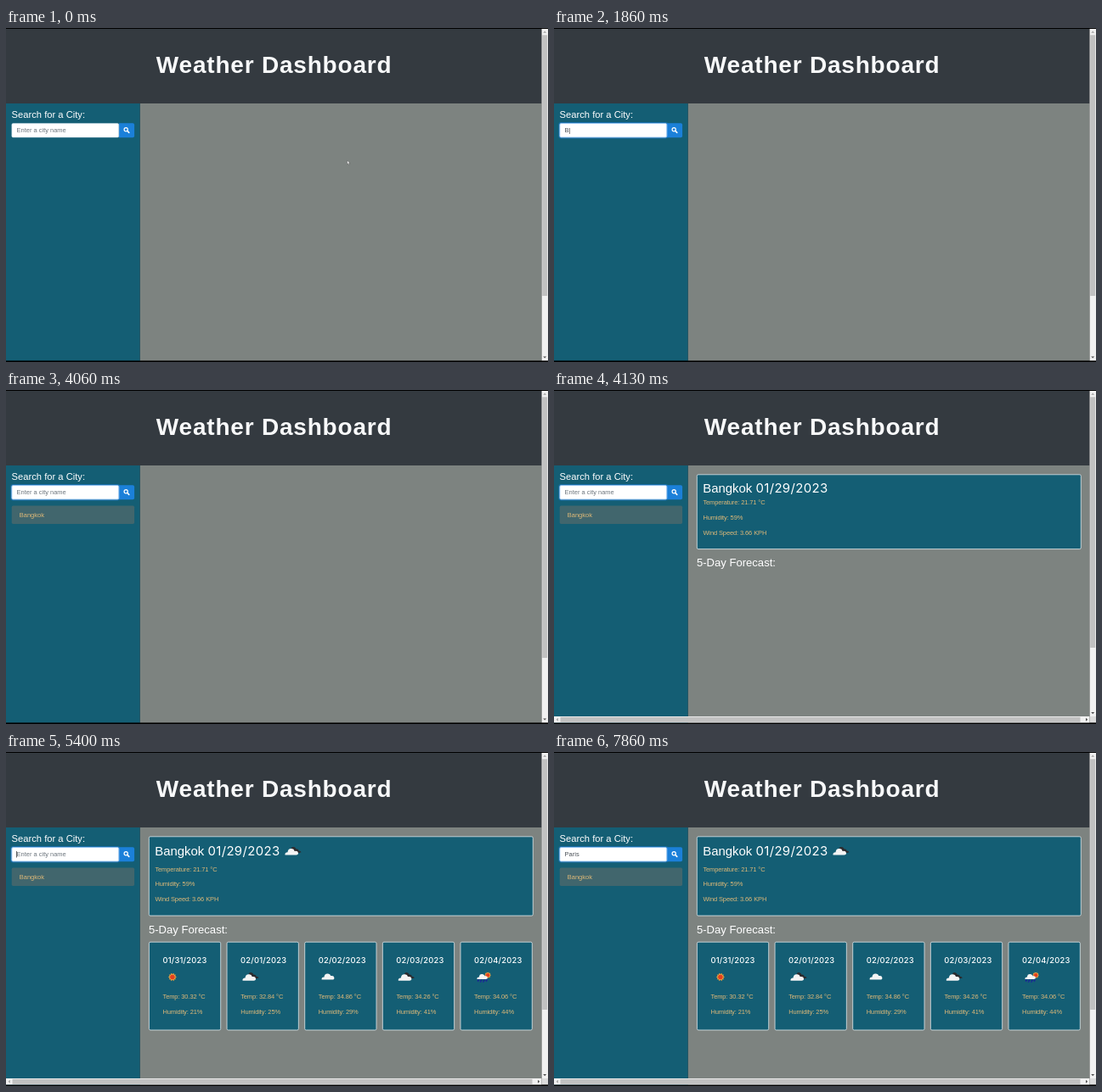
Animation of 638 by 394 pixels, one loop 8 s. Source, as an HTML page:

```html
<!DOCTYPE html>
<html lang="en">
<head>
<meta charset="utf-8">
<title>Weather Dashboard</title>
<style>
  html, body { margin: 0; height: 100%; overflow: hidden; background: #000; }
  svg { display: block; width: 100vw; height: 100vh; }
  text { font: 7.47px "Liberation Sans", Arial, sans-serif; white-space: pre; }
  .title { font-size: 28px; font-weight: 700; letter-spacing: .8px; }
  .h2 { font-size: 14.93px; }
  .h3 { font-size: 13.07px; }
  .h4 { font-size: 11.2px; }
  .h5 { font-size: 9.33px; }
  .date { font-family: Inter, sans-serif; font-weight: 500; letter-spacing: .025em; }
  .h2 .date { font-weight: 400; }
  .info { letter-spacing: -.1px; }
</style>
</head>
<body>
<svg id="stage" viewBox="0 0 638 394" preserveAspectRatio="none"></svg>
<script>
const LOOP = 8000, BLINK = 532;
const TEAL = '#145e74', GOLD = '#dfb978', WHITE = '#fff';
const stage = document.getElementById('stage');

// Key presses per word, and the moments that restart the caret blink.
const bangkok = [1860, 2130, 2400, 2600, 2930, 3060, 3260];
const paris = [5600, 5930, 6260, 6600, 6800];
const caretStarts = [800, ...bangkok, ...paris];

const days = [
  ['01/31/2023', '30.32', 21, 'sun'],
  ['02/01/2023', '32.84', 25, 'overcast'],
  ['02/02/2023', '34.86', 29, 'cloud'],
  ['02/03/2023', '34.26', 41, 'overcast'],
  ['02/04/2023', '34.06', 44, 'rain']
];

const rect = (x, y, w, h, fill, extra = '') =>
  `<rect x="${x}" y="${y}" width="${w}" height="${h}" fill="${fill}" ${extra}/>`;
const path = (d, fill, extra = '') => `<path d="${d}" fill="${fill}" ${extra}/>`;
const text = (x, y, s, fill = WHITE, cls = '') =>
  `<text x="${x}" y="${y}" fill="${fill}" class="${cls}">${s}</text>`;
const date = s => `<tspan class="date">${s}</tspan>`;
const info = (x, y, s) => text(x, y, s, GOLD, 'info');
const panel = (x, y, w, h) =>
  rect(x, y, w, h, TEAL, 'rx="1.6" stroke="#dfe9ec" stroke-width=".8"');

const puff = path('M-9 4.5q-.6-3 3-3.2q.4-4.6 4.8-4.2q2.8.3 3.4 2.8q3.8-.9 4.3 2.2q.3 2.4-2.5 2.4z',
  '#f4f4f4');

function sun(x, y, r) {
  let points = '';
  for (let i = 0; i < 20; i++) {
    const a = i * Math.PI / 10, d = i % 2 ? r * .68 : r;
    points += `${(x + d * Math.cos(a)).toFixed(2)},${(y + d * Math.sin(a)).toFixed(2)} `;
  }
  return `<polygon points="${points}" fill="#f2a33c"/><circle cx="${x}" cy="${y}" r="${r * .55}" fill="#e2401f"/>`;
}

const icons = {
  sun: sun(0, .2, 5),
  cloud: `<g transform="translate(1 -1) scale(.95)">${puff}</g>`,
  overcast: path('M-2-3q.6-2.6 3.4-2q2 .3 2.4 2.3q3 0 3.2 2.3q2.6.2 3 1.6l-6 1.6z', '#2c2b2e') + puff,
  rain: sun(4.6, -2, 4) +
    path('M-6 3l-1.2 2.6M-2.6 3l-1.6 3.6M.8 3l-1.6 3.6M3.8 3l-1.2 2.6', 'none', 'stroke="#1c2a96" stroke-width="1.6"') +
    `<g transform="translate(-.8 -.8) scale(.8)">${puff}</g>`
};
const icon = (name, x, y) => `<g transform="translate(${x} ${y})">${icons[name]}</g>`;

function arrow(x, y, angle, fill) {
  return path('M-2 1L0-1.2L2 1z', fill, `transform="translate(${x} ${y}) rotate(${angle})"`);
}

function scrollbars(both) {
  const bottom = both ? 385 : 392.4;
  let out = rect(630.5, 1, 7.5, bottom - 1, '#f1f1f1') +
    rect(631.2, 8.3, 6, (both ? 304 : 316) - 8.3, '#c1c1c1') +
    arrow(634.2, 4.7, 0, '#a3a3a3') + arrow(634.2, bottom - 4, 180, '#505050');
  if (both) {
    out += rect(0, 385, 630.5, 7.4, '#f1f1f1') + rect(630.5, 385, 7.5, 7.4, '#dcdcdc') +
      rect(7.5, 385.8, 612, 6, '#c1c1c1') +
      arrow(3.8, 388.7, -90, '#a3a3a3') + arrow(627, 388.7, 90, '#505050');
  }
  return out;
}

function searchBox(t) {
  const word = t < 4060 ? 'Bangkok' : 'Paris';
  const typed = word.slice(0, (t < 4060 ? bangkok : paris).filter(k => k <= t).length);
  const focus = Math.min(1, Math.max(0, (t - 800) / 200));
  const last = caretStarts.filter(k => k <= t).pop();
  const caretOn = last !== undefined && Math.floor((t - last) / BLINK) % 2 === 0;
  const caret = caretOn ? '<tspan fill="#222" dx="-.3">|</tspan>' : '';
  const content = typed
    ? text(12.6, 123.3, typed + caret, '#495057')
    : text(12.6, 123.3, 'Enter a city name', '#6c757d') + (caretOn ? rect(12.1, 117, .7, 7.5, '#222') : '');
  return text(6.6, 106, 'Search for a City:', WHITE, 'h4') +
    path('M133 112.3h16.2q1.9 0 1.9 1.9v13.1q0 1.9-1.9 1.9h-16.2z', '#1b80d9') +
    `<circle cx="141.2" cy="119.8" r="2.1" fill="none" stroke="#fff" stroke-width="1.2"/>` +
    path('M142.8 121.4l2 2', 'none', 'stroke="#fff" stroke-width="1.5" stroke-linecap="round"') +
    rect(6, 111.6, 127.6, 18.2, 'none', `rx="2.4" stroke="#1c7fe0" stroke-width="1.3" opacity="${focus * .45}"`) +
    rect(6.8, 112.5, 126, 16.5, WHITE, 'rx="1.6" stroke="#b9d3e0" stroke-width=".5"') +
    rect(6.8, 112.5, 126, 16.5, 'none', `rx="1.6" stroke="#80bdff" stroke-width=".6" opacity="${focus}"`) +
    content;
}

function pointer(t) {
  if (t >= 1860) return '';
  const p = Math.min(1, Math.floor((t + 7) / 66.67) / 9);
  const e = p * p * (3 - 2 * p);
  const x = 401.7 - 331 * e, y = 156.3 - 36 * e;
  const overInput = x < 133 && y < 129;
  const shape = overInput
    ? path('M-1-3h2M0-3v6M-1 3h2', 'none', 'stroke="#333" stroke-width=".5"')
    : path('M0 0v4.4l1-.9l.8 1.5l.7-.4l-.7-1.4h1.3z', WHITE, 'stroke="#222" stroke-width=".3"');
  return `<g transform="translate(${x} ${y})">${shape}</g>`;
}

function forecast(t) {
  const drop = t >= 4260 ? 5.5 : 0;
  const grow = t >= 4330 ? 11.3 : 0;
  let out = panel(168.3, 99.8, 452, 87.8 + drop) +
    text(175.2, 120.8 + drop / 4, 'Bangkok ' + date('01/29/2023'), WHITE, 'h2') +
    (drop ? icon('overcast', 337.5, 117) : '');
  ['Temperature: 21.71 °C', 'Humidity: 59%', 'Wind Speed: 3.66 KPH']
    .forEach((s, i) => out += info(175.4, 135.2 + drop + 17.7 * i, s));
  out += text(168, 208.4 + drop, '5-Day Forecast:', WHITE, 'h3');
  if (t < 4200) return out;
  days.forEach(([day, temp, humidity, sky], i) => {
    const x = 168.4 + 91.65 * i, y = 218.7 + drop;
    out += panel(x, y, 84.3, 92.5 + grow) +
      text(x + 16, y + 24.8, date(day), WHITE, 'h5') +
      info(x + 16.1, y + 55.8 + grow, `Temp: ${temp} °C`) +
      info(x + 16.1, y + 73.5 + grow, `Humidity: ${humidity}%`) +
      (grow ? icon(sky, x + 27.5, y + 41) : '');
  });
  return out;
}

function scene(t) {
  const loaded = t >= 4130;
  return rect(0, 0, 638, 394, '#000') +
    rect(0, 1, 630.5, 88, '#343a40') +
    rect(0, 89, 157.8, 303.4, TEAL) +
    rect(157.8, 89, 472.7, 303.4, '#7d8380') +
    text(176.8, 52.8, 'Weather Dashboard', '#f8f9fa', 'title') +
    searchBox(t) +
    (t >= 4060 ? rect(6.7, 136.5, 144.4, 21.5, '#41666d', 'rx="1.8"') + text(15.8, 149.7, 'Bangkok', GOLD) : '') +
    (loaded ? forecast(t) : '') +
    scrollbars(loaded) +
    pointer(t);
}

let shown = '';
function draw() {
  const markup = scene(performance.now() % LOOP);
  if (markup !== shown) stage.innerHTML = shown = markup;
  requestAnimationFrame(draw);
}
draw();
</script>
</body>
</html>
```
